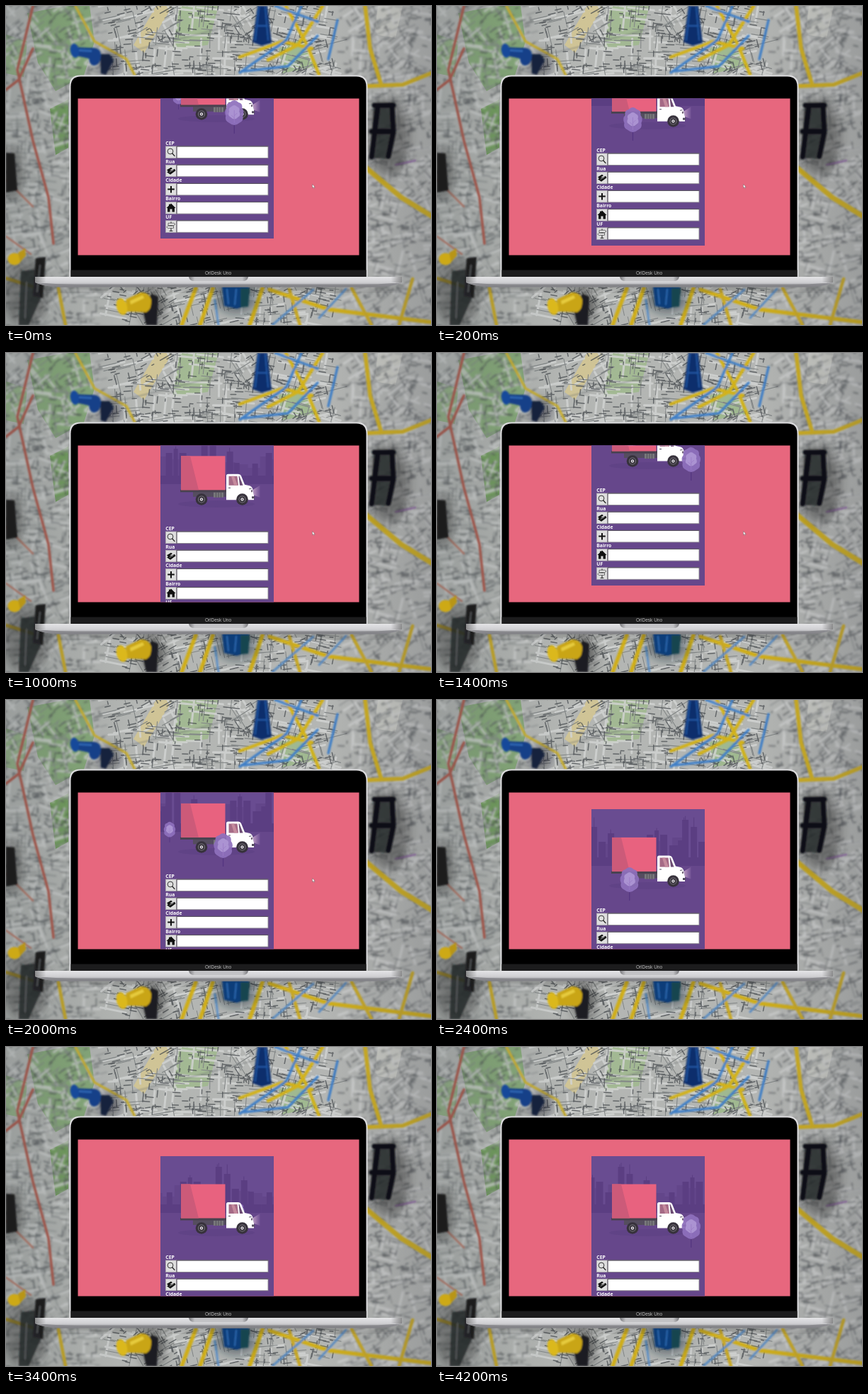
An HTML page that plays this animation: 600x450 px, repeating every 4.4 s.

```html
<!DOCTYPE html>
<html lang="pt">
<head>
<meta charset="utf-8">
<title>Busca CEP</title>
<style>
html, body { margin: 0; width: 100%; height: 100%; overflow: hidden; background: #a9aba8; }
svg { display: block; position: absolute; left: 0; top: 0; }
.label { font: bold 6.8px "Noto Sans", "Open Sans", sans-serif; fill: #fff; }
.brand { font: 6.5px "Liberation Sans", Arial, sans-serif; fill: #b9b9b9; text-anchor: middle; }
.line { fill: none; stroke-linecap: round; stroke-linejoin: round; }
</style>
</head>
<body>
<svg width="600" height="450" viewBox="0 0 600 450">
  <defs>
    <filter id="wide" x="-5%" y="-5%" width="110%" height="110%"><feGaussianBlur stdDeviation="1.5"/></filter>
    <filter id="soft" x="-5%" y="-5%" width="110%" height="110%"><feGaussianBlur stdDeviation="0.7"/></filter>
    <filter id="haze" x="-40%" y="-40%" width="180%" height="180%"><feGaussianBlur stdDeviation="7"/></filter>
    <filter id="edge" x="-20%" y="-20%" width="140%" height="140%"><feGaussianBlur stdDeviation="0.9"/></filter>
    <linearGradient id="dim">
      <stop offset="0" stop-color="#3c4548" stop-opacity=".26"/><stop offset=".3" stop-color="#3c4548" stop-opacity=".06"/>
      <stop offset=".75" stop-color="#40424a" stop-opacity=".06"/><stop offset="1" stop-color="#40424a" stop-opacity=".26"/>
    </linearGradient>
    <linearGradient id="metal" x2="0" y2="1">
      <stop offset="0" stop-color="#e4e4e6"/><stop offset=".55" stop-color="#cfcfd2"/><stop offset="1" stop-color="#8f8f93"/>
    </linearGradient>
    <linearGradient id="ends">
      <stop offset="0" stop-color="#555" stop-opacity=".6"/><stop offset=".03" stop-color="#555" stop-opacity="0"/>
      <stop offset=".97" stop-color="#555" stop-opacity="0"/><stop offset="1" stop-color="#555" stop-opacity=".6"/>
    </linearGradient>
    <linearGradient id="notch">
      <stop offset="0" stop-color="#77777b"/><stop offset=".1" stop-color="#c2c2c5"/>
      <stop offset=".9" stop-color="#c2c2c5"/><stop offset="1" stop-color="#77777b"/>
    </linearGradient>
    <linearGradient id="beam">
      <stop offset="0" stop-color="#d9b5d3" stop-opacity=".75"/><stop offset="1" stop-color="#b795c8" stop-opacity=".15"/>
    </linearGradient>
    <clipPath id="view"><rect x="101.5" y="130.5" width="397" height="221"/></clipPath>
    <clipPath id="scene"><rect x="218" y="154" width="160" height="136"/></clipPath>
    <g id="tree">
      <path d="M0 0V29" stroke="#543681" stroke-width="1.3"/>
      <path d="M-6 -15Q0 -21 6 -15Q12 -14 11 -7Q15 -2 12 4Q14 11 7 14Q0 20 -7 14Q-14 11 -12 4Q-15 -2 -11 -7Q-12 -14 -6 -15Z" fill="#8f70bd" fill-opacity=".93"/>
      <path d="M-4 -9Q0 -13 4 -9Q9 -7 7 -2Q10 3 5 6Q0 11 -5 6Q-10 3 -7 -2Q-9 -7 -4 -9Z" fill="#ab93d2"/>
      <path d="M0 -4V14M0 4l4 -4M0 7l-4 -4" stroke="#9b7cc6" stroke-width=".8" fill="none"/>
    </g>
  </defs>

  <g id="map"></g>

  <g id="laptop">
    <path d="M89.500 383V113Q89.500 97.500 105 97.500H495Q510.500 97.500 510.500 113V383Z" fill="#dcdcde"/>
    <path d="M91.500 383V113.500Q91.500 99.500 105.500 99.500H494.500Q508.500 99.500 508.500 113.500V383Z" fill="#000"/>
    <rect x="91.500" y="372.500" width="417" height="9.500" fill="#1c1c1d"/>
    <text class="brand" x="299.500" y="379.300">OrlDesk Uno</text>
    <path d="M41 382H559V390Q545 396.500 520 396.500H80Q55 396.500 41 390Z" fill="url(#metal)"/>
    <path d="M41 382H559V390H41Z" fill="url(#ends)"/>
    <path d="M41 390Q55 396.500 80 396.500H520Q545 396.500 559 390Q530 392.500 500 392.500H100Q70 392.500 41 390Z" fill="#77777b" opacity=".65"/>
    <path d="M258 382H342Q341 388 334 388H266Q259 388 258 382Z" fill="url(#notch)"/>
  </g>

  <g clip-path="url(#view)">
    <rect x="101" y="130" width="398" height="222" fill="#e7677e"/>
    <g id="page">
      <rect x="218" y="154" width="160" height="277" fill="#66478b"/>
      <g clip-path="url(#scene)">
        <rect x="218" y="154" width="160" height="80" fill="#694c91"/>
        <g id="city"></g>
        <ellipse cx="297" cy="262" rx="54" ry="5" fill="#604386"/>
        <use id="far" href="#tree"/>
        <g id="truck">
          <path d="M349 241L358.500 235V252L350 249Z" fill="url(#beam)"/>
          <rect x="264" y="243" width="48" height="8" fill="#554d5f"/>
          <rect x="246" y="241" width="66" height="3.500" fill="#49424f"/>
          <path d="M293 245h14v7h-14z" fill="#77777a"/>
          <path d="M296.500 245v7M300 245v7M303.500 245v7" stroke="#55515b"/>
          <rect x="247" y="193.500" width="62.500" height="48" fill="#e8627f"/>
          <path d="M247 193.500H260L272 241.500H247Z" fill="#cc5a79"/>
          <path d="M311 255.500V221.500Q311 219 313.500 219H328Q331 219 332 221.500L337 234L344 235.500Q347.500 236.500 348.500 241L350 249V255.500Z" fill="#fff"/>
          <path d="M314.500 222H326.500L328 235H314.500Z" fill="#a56a86"/>
          <path d="M318 222H322L327 235H322Z" fill="#c58b9d"/>
          <path d="M328.500 222H329.500L334.500 235H330Z" fill="#6d4d74"/>
          <path d="M314 238.500h3M343 240l3.500 -.5" stroke="#554d5f"/>
          <ellipse cx="347" cy="243" rx="1.100" ry="1.700" fill="#6b5b70"/>
          <path d="M347 250.500h4v3h-4z" fill="#554d5f"/>
        </g>
        <g id="wheels"></g>
        <use id="near" href="#tree"/>
      </g>
      <g id="form"></g>
    </g>
    <path id="cursor" d="M432.500 251.500v5l1.200 -1 .8 1.800 .9 -.4 -.8 -1.700h1.600z" fill="#fff" stroke="#555" stroke-width=".4"/>
  </g>
</svg>
<script>
const LOOP = 4400, STEP = 200, CYCLE = 2800, CITY_W = 141;
const el = id => document.getElementById(id);
const mod = (a, n) => ((a % n) + n) % n;

let seed = 41;
const rnd = () => (seed = (seed * 16807) % 2147483647) / 2147483647;
const line = (d, color, w, extra = "") =>
  `<path class="line" d="${d}" stroke="${color}" stroke-width="${w}" ${extra}/>`;
const fill = (d, color, extra = "") => `<path d="${d}" fill="${color}" ${extra}/>`;

// Street blocks between two x limits: each cell has its own direction.
function streets(from, to, blur) {
  let light = "", thin = "", dark = "";
  const seg = (x, y, a, len) => {
    const dx = Math.cos(a) * len / 2, dy = Math.sin(a) * len / 2;
    return `M${(x - dx).toFixed(1)} ${(y - dy).toFixed(1)}L${(x + dx).toFixed(1)} ${(y + dy).toFixed(1)}`;
  };
  for (let cy = 20; cy < 460; cy += 45) for (let cx = from + 20; cx < to; cx += 45) {
    const tilt = -0.7 + rnd() * 1.1;
    if (cx > 125 && cx < 475 && cy > 130 && cy < 360) continue;
    for (let i = 0; i < 34; i++) {
      const x = cx + (rnd() - .5) * 54, y = cy + (rnd() - .5) * 54;
      const a = tilt + (rnd() < .3 ? Math.PI / 2 : 0), r = rnd();
      if (i < 6) light += seg(x, y, a, 12 + r * 30);
      else if (i < 14) thin += seg(x, y, a, 12 + r * 22);
      else dark += seg(x, y, a, 3 + r * 9);
    }
  }
  return `<g filter="url(#${blur})">` + line(light, "#dddedd", 3, 'opacity=".8"') +
    line(thin, "#868a8a", 1.1) + line(dark, "#45494d", 1.5, 'opacity=".72"') + "</g>";
}

function drawMap() {
  const ground = `<rect width="600" height="450" fill="#bbbdba"/>` +
    fill("M30 10L85 0H118L125 50L110 98L70 120L45 80Z", "#8cb07d") +
    fill("M62 145L88 132V200L70 210Z", "#76a45f") +
    fill("M245 0H300L285 55L235 62Z", "#a9c098") +
    fill("M0 40L30 50L25 100L0 95Z", "#9ab88b") +
    fill("M180 55L212 0H235L195 66Z", "#d9cc9b") +
    fill("M385 60L420 45L440 85L390 95Z", "#a6c095") +
    fill("M525 0H560L550 45L520 40Z", "#d3d4cd");
  const roads =
    line("M395 0L425 55L442 97M447 0L412 55L370 76M330 72L390 50L432 60", "#dcb916", 4.5) +
    line("M507 0L514 60L530 112M508 113L560 111L602 94", "#d9b61c", 5.5) +
    line("M508 228L558 270L602 297", "#d8b51a", 7) +
    line("M98 0L125 50L170 75L182 98", "#d4b832", 3.5) +
    line("M268 398L248 450M292 398L274 450M362 398L344 450M372 400L455 428L600 446", "#d9b516", 5.5) +
    line("M488 398L516 450M574 385L555 450M400 400L415 450M0 384L42 397M74 398L84 450", "#d0ae22", 4.5) +
    line("M417 0L396 48L330 94M380 0L440 22M440 42L398 85L335 92M468 20L455 75", "#3f83cf", 3.4) +
    line("M376 450L434 400M295 415L300 450M442 440L480 399", "#5c90c8", 3) +
    line("M38 0L16 90L38 190L60 270L67 335M0 118L18 104L38 60", "#b75a4c", 3.5) +
    line("M0 245L38 283M0 325L35 350", "#c27d6b", 2.5) +
    line("M550 224L578 218", "#9a72ae", 2.5) +
    line("M140 72Q235 50 369 14", "#686d6e", .8);
  const blot = (x, y, rx, ry, c, o) =>
    `<ellipse cx="${x}" cy="${y}" rx="${rx}" ry="${ry}" fill="${c}" opacity="${o}" filter="url(#haze)"/>`;
  const shade = `<rect width="600" height="450" fill="url(#dim)"/>` +
    blot(540, 185, 30, 55, "#222", .42) + blot(28, 405, 32, 48, "#222", .4) + blot(8, 235, 15, 38, "#222", .4) +
    blot(208, 425, 18, 28, "#222", .5) + blot(146, 82, 14, 16, "#112", .5) +
    blot(325, 412, 30, 22, "#123", .45) + blot(300, 396, 260, 5, "#222", .4);
  const pins =
    // blue pin, upper left
    fill("M133 68L146 68L152 76L141 97L134 95Z", "#17243d") +
    fill("M98 58L120 59Q134 58 134 70Q133 83 124 84Q118 83 117 74L99 70Z", "#123f88") +
    `<ellipse cx="97" cy="63" rx="6" ry="10" fill="#164a9a" transform="rotate(-10 97 63)"/>` +
    fill("M103 61L121 62V65L103 64Z", "#2e64b0") +
    // blue clip, top
    fill("M355 0H369L375 52L361 56L348 51Z", "#102f6c") +
    line("M357 2L352 48M366 2L370 48M355 28H369", "#2459a6", 1.8) +
    // black clips
    fill("M519 138L547 136L549 178L541 216L515 214Z", "#252629", 'opacity=".75"') +
    line("M525 141L516 213M545 140L547 178L540 212M520 140H547M516 177H546", "#101114", 7) +
    fill("M0 207L12 208L16 260L0 263Z", "#1c1d1f") +
    fill("M42 356L56 354L52 412L38 409Z", "#1c1d1f") +
    fill("M21 374L42 372L49 412L32 450H18Z", "#242527", 'opacity=".8"') +
    line("M29 390L27 440M48 366L44 403", "#55585a", 1.8) +
    // yellow pins
    fill("M205 406L215 410L213 450H198L194 432Z", "#1d1e20") +
    fill("M169 414L190 404Q201 403 205 414Q206 428 198 432L171 431Z", "#c9a515") +
    `<ellipse cx="163.500" cy="424" rx="7.500" ry="12" fill="#dbb81c" transform="rotate(-15 163.5 424)"/>` +
    fill("M175 416L193 408L195 412L176 421Z", "#e6cb3d") +
    `<ellipse cx="12" cy="357" rx="9.500" ry="8.500" fill="#cda918"/>` +
    fill("M17 348L27 342L28 352L20 361Z", "#b89516") +
    // blue clip, bottom
    fill("M305 396H343L340 422L326 427L308 423Z", "#103d79") +
    fill("M331 398H344L342 424L331 425Z", "#154550") +
    line("M312 400L314 420M325 400L323 421", "#2b69b0", 2);
  el("map").innerHTML = ground + streets(0, 150, "wide") + streets(150, 480, "soft") + streets(480, 620, "wide") +
    `<g filter="url(#edge)">${roads}</g>${shade}<g filter="url(#edge)">${pins}</g>`;
}

// Towers as [offset, width, top] relative to the right spire.
function drawCity() {
  const back = [[-92, 20, 211], [-74, 11, 195], [-58, 14, 199], [-30, 17, 194], [14, 18, 203], [36, 14, 206]];
  const front = [[-85, 8, 205], [-66, 9, 190], [-55, 6, 184], [-47, 10, 190], [-34, 12, 205], [-22, 7, 198],
    [-16, 9, 169], [-4, 9, 179], [7, 10, 200], [20, 9, 188], [30, 8, 204]];
  const towers = (list, c) => fill(list.map(([x, w, y]) => `M${x} ${y}h${w}V234h${-w}z`).join(""), c);
  const tile = towers(back, "#63468a") + towers(front, "#5b3e82") +
    line("M-11.500 164V170M-13.500 166V170M.5 166V180M-52 181V185M24 183V188", "#5b3e82", 1) +
    fill("M-92 222h141v12h-141z", "#5b3e82");
  el("city").innerHTML = [-2, -1, 0, 1].map(i => `<g transform="translate(${i * CITY_W})">${tile}</g>`).join("");
}

function drawWheels() {
  const ring = (x, r, c) => `<circle cx="${x}" cy="255.500" r="${r}" fill="${c}"/>`;
  el("wheels").innerHTML = [276, 333.5].map(x =>
    ring(x, 8.3, "#37323c") + ring(x, 5, "#77757b") + ring(x, 3.9, "#302c35") + ring(x, 2.2, "#e8e5ea") + ring(x, .9, "#49434f")
  ).join("");
}

function drawForm() {
  const icons = [
    `<circle cx="7" cy="7" r="3.900" fill="none" stroke="#222" stroke-width=".9"/>` + line("M9.800 10L13 13.500", "#222", 1.2),
    fill("M2 7L8 3.500L10 5L6 7.500H9L13 5.500L14.500 8L7 13.500L2 10L4 9Z", "#111") + line("M6 10L11 7.500", "#ddd", .7),
    line("M8 3.500V13M3.200 8.200H12.800", "#111", 2, 'style="stroke-linecap:butt"'),
    fill("M8 2L14.500 8.500H13V14H9.500V10H6.500V14H3V8.500H1.500L5 5V3H6.500V3.600Z", "#111"),
    line("M8 2V14.500M6 14.500H10", "#222", 1) +
      `<path d="M4 3.500H12L14 5L12 6.500H4ZM3.500 7.500H11.500V10.500H3.500L1.800 9Z" fill="#eee" stroke="#333" stroke-width=".7"/>`
  ];
  el("form").innerHTML = ["CEP", "Rua", "Cidade", "Bairro", "UF"].map((name, i) => {
    const y = 301 + i * 26.2;
    return `<text class="label" x="225.300" y="${y - 2.4}">${name}</text>
      <rect x="225.500" y="${y}" width="16" height="16.500" fill="#dedede" stroke="#aaa" stroke-width=".7"/>
      <g transform="translate(225 ${y})">${icons[i]}</g>
      <rect x="241" y="${y}" width="129" height="16.500" fill="#fff" stroke="#8b878f" stroke-width=".9"/>
      ${line(`M241 ${y + 16.5}V${y}H370`, "#4d4853", .9)}`;
  }).join("");
}

const SCROLL = [[0, 103], [200, 93], [400, 40], [600, 0], [800, 0], [1200, 98], [1400, 103], [1700, 103],
  [2000, 48], [2200, 10], [2400, 0], [LOOP, 0]];
function track(keys, t) {
  const i = Math.max(1, keys.findIndex(k => k[0] >= t));
  const [a, u] = keys[i - 1], [b, v] = keys[i];
  return u + (v - u) * (t - a) / (b - a);
}

function render(t) {
  const scroll = track(SCROLL, t);
  const drive = t < 600 ? 1820 + t * 1580 / 600 : t;
  const p = mod(drive, CYCLE);
  const place = (id, x, y, s = 1) =>
    el(id).setAttribute("transform", `translate(${x.toFixed(2)} ${y.toFixed(2)}) scale(${s})`);
  place("page", 0, -scroll);
  place("city", 342 - p * CITY_W / CYCLE, 0);
  place("far", 370 - p * .0695, 231, .62);
  place("near", p < 700 ? 237 - p * .087 : 237 + (CYCLE - p) * .087, 254);
  place("truck", 0, .4 - .4 * Math.cos((p - 600) * Math.PI / 400));
  el("cursor").style.display = scroll > 0 ? "" : "none";
}

drawMap();
drawCity();
drawWheels();
drawForm();
let last = -1;
function tick() {
  const t = Math.floor(performance.now() % LOOP / STEP) * STEP;
  if (t !== last) render(last = t);
  requestAnimationFrame(tick);
}
tick();
</script>
</body>
</html>
```
